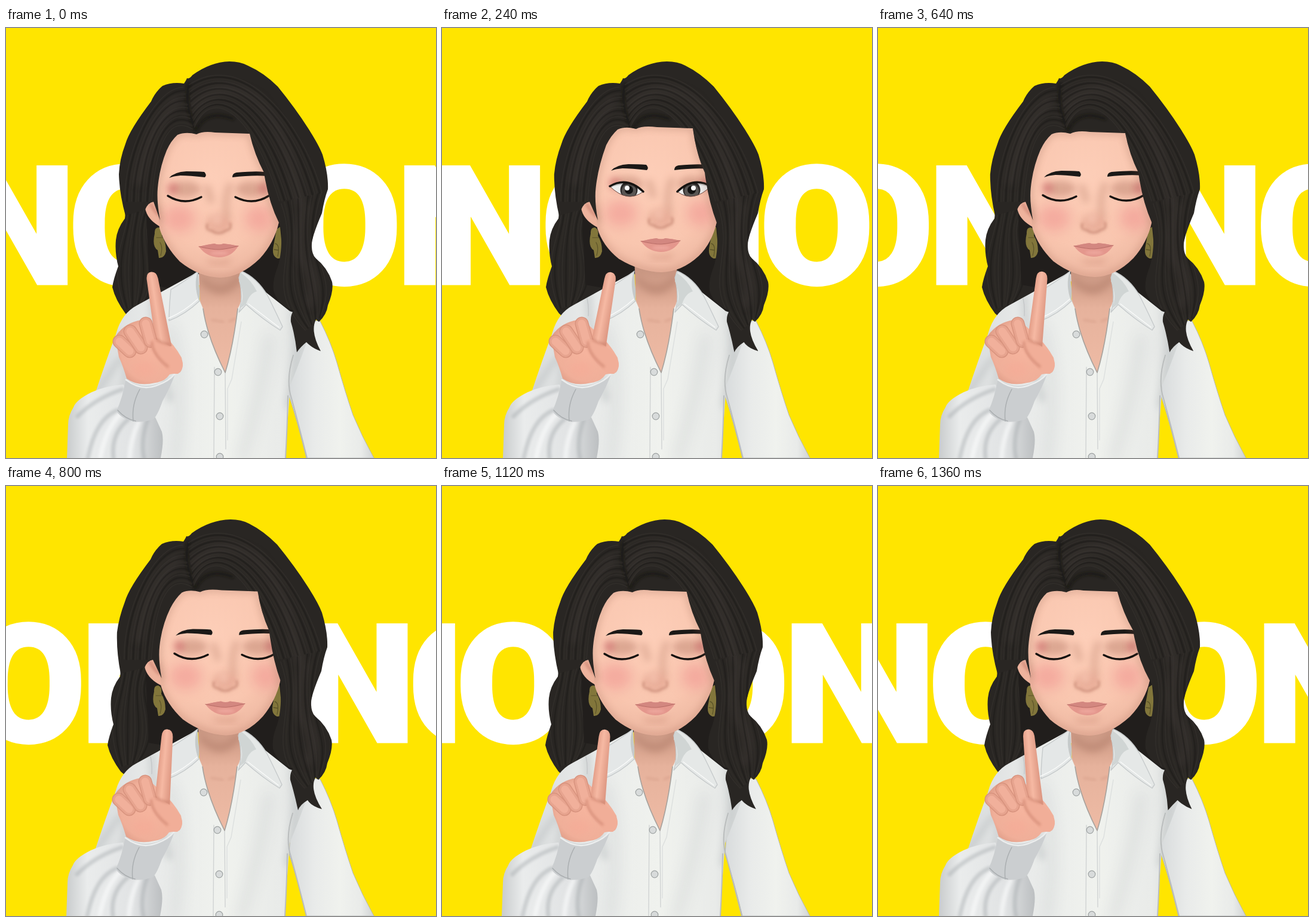
Animation, 720 px wide and 720 px high, one loop 1.44 s. Source, as an HTML page:

```html
<!DOCTYPE html>
<html lang="en">
<head>
<meta charset="utf-8">
<title>No no no</title>
<style>
html, body { margin: 0; width: 100%; height: 100%; overflow: hidden; background: #ffe500; }
svg { display: block; width: 100vw; height: 100vh; }
#words { font: 900 275px Roboto, sans-serif; fill: #fff; stroke: #fff; stroke-width: 5px; text-anchor: middle; }
path { stroke-linecap: round; stroke-linejoin: round; }
.line { fill: none; }
</style>
</head>
<body>
<svg viewBox="0 0 720 720">
<defs>
  <filter id="b2" x="-50%" y="-50%" width="200%" height="200%"><feGaussianBlur stdDeviation="2"/></filter>
  <filter id="b6" x="-50%" y="-50%" width="200%" height="200%"><feGaussianBlur stdDeviation="6"/></filter>
  <filter id="b12" x="-80%" y="-80%" width="260%" height="260%"><feGaussianBlur stdDeviation="11"/></filter>
  <radialGradient id="skin" gradientUnits="userSpaceOnUse" cx="345" cy="250" r="190">
    <stop offset="0" stop-color="#fdceb8"/><stop offset=".6" stop-color="#f9c6af"/><stop offset="1" stop-color="#e7b09a"/>
  </radialGradient>
  <linearGradient id="neckSkin" x1="0" y1="0" x2="0" y2="1">
    <stop offset="0" stop-color="#bd8c79"/><stop offset=".35" stop-color="#dca892"/><stop offset=".45" stop-color="#e6b29c"/><stop offset="1" stop-color="#eebba5"/>
  </linearGradient>
  <linearGradient id="cloth" x1="0" y1="0" x2="1" y2="0">
    <stop offset="0" stop-color="#d8dbdc"/><stop offset=".3" stop-color="#e9ebea"/><stop offset=".6" stop-color="#f0f2ee"/><stop offset=".85" stop-color="#e9ebe9"/><stop offset="1" stop-color="#d0d3d4"/>
  </linearGradient>
  <linearGradient id="sleeveFill" x1="0" y1="0" x2="1" y2="0">
    <stop offset="0" stop-color="#c9cccd"/><stop offset=".22" stop-color="#eaecec"/><stop offset=".7" stop-color="#e1e3e4"/><stop offset="1" stop-color="#bcbfc1"/>
  </linearGradient>
  <linearGradient id="fingerFill" x1="0" y1="0" x2="1" y2="0">
    <stop offset="0" stop-color="#e29c86"/><stop offset=".4" stop-color="#f6b9a3"/><stop offset="1" stop-color="#db947f"/>
  </linearGradient>
  <radialGradient id="palmFill" cx=".55" cy=".5" r=".65">
    <stop offset="0" stop-color="#f6b49e"/><stop offset=".7" stop-color="#f0af99"/><stop offset="1" stop-color="#d89580"/>
  </radialGradient>
  <clipPath id="faceClip"><path id="faceClipPath"/></clipPath>
  <clipPath id="eyeClip"><path id="eyeClipPath"/></clipPath>
  <clipPath id="hairClip"><path id="hairClipPath"/></clipPath>
  <clipPath id="torsoClip"><use href="#torso"/></clipPath>
  <clipPath id="lockClip"><use href="#lock"/></clipPath>
  <g id="eyeShade">
    <ellipse cx="301" cy="270" rx="25" ry="13" fill="#c78f7c" opacity=".6" filter="url(#b6)"/>
    <ellipse cx="279" cy="269" rx="9" ry="10" fill="#cf6f70" opacity=".65" filter="url(#b6)"/>
  </g>
  <g id="eye">
    <g clip-path="url(#eyeClip)">
      <rect x="265" y="255" width="70" height="45" fill="#eeeeee"/>
      <circle cx="303" cy="280" r="14.5" fill="#2e2b2a"/>
      <circle cx="303" cy="282" r="12" fill="#595654"/>
      <circle cx="303" cy="280" r="7" fill="#141313"/>
      <circle cx="300" cy="277" r="4" fill="#fff"/>
      <path class="line" d="M271 273Q300 260 328 281" stroke="#000" stroke-width="7" opacity=".2"/>
    </g>
    <path id="underLid" class="line" stroke="#6b453c" stroke-width="1"/>
    <path id="lash" class="line" stroke="#151210" stroke-width="3.4"/>
  </g>
</defs>

<rect width="720" height="720" fill="#ffe500"/>
<g id="words"></g>

<g id="figure">
  <g id="locks">
    <path id="lock" fill="#292623" d="M225 240L200 300Q200 312 199 319Q186 336 184 355Q182 376 188 399Q180 420 178 434Q183 455 200 478L225 500L320 440L320 240Z"/>
    <g id="lockStrands" clip-path="url(#lockClip)"></g>
  </g>
  <path fill="#211e1c" d="M230 200L480 200L500 495L430 460L322 412L275 436L240 430Z"/>

  <path d="M322 380L392 380Q394 440 402 470L385 580L350 580L325 470Z" fill="url(#neckSkin)"/>
  <path d="M325 415Q360 445 392 412L393 424Q362 466 327 428Z" fill="#a87562" opacity=".45" filter="url(#b6)"/>
  <path class="line" d="M345 489L364 492M384 487L374 491" stroke="#c88e7a" stroke-width="3" opacity=".4" filter="url(#b2)"/>

  <path id="arm" d="M505 488L526 491Q544 526 554 560Q568 610 581 648Q596 684 616 720L503 720Q488 658 474 616Q478 540 505 488Z" fill="url(#cloth)" stroke="#b5b8b9"/>
  <path id="torso" fill="url(#cloth)" d="M322 408Q312 430 330 470Q337 518 367 577Q380 535 388 470Q400 452 392 408Q410 412 432 440L475 474L516 488Q500 540 476 598Q471 660 468 720L140 720L150 610Q168 555 184 513Q193 478 220 464Z"/>
  <g clip-path="url(#torsoClip)">
    <path class="line" d="M246 452Q244 500 274 620M484 480Q494 540 474 630" stroke="#9fa5a7" stroke-width="13" opacity=".3" filter="url(#b6)"/>
    <path class="line" d="M275 505Q300 580 284 720M440 520Q430 600 395 720" stroke="#c2c6c8" stroke-width="16" opacity=".35" filter="url(#b12)"/>
    <path class="line" d="M185 512Q210 545 195 612M150 612L190 555" stroke="#b8bcbd" stroke-width="9" opacity=".55" filter="url(#b6)"/>
  </g>
  <path class="line" d="M481 548Q468 590 478 620Q490 664 504 720M472 616Q471 670 468 720" stroke="#babdbd" stroke-width="2"/>
  <path class="line" d="M243 453Q246 466 245 482M489 510L487 530" stroke="#c5c8c9" stroke-width="1.5"/>

  <path class="line" d="M349 568L348 720M367 577L368 705" stroke="#d0d3d3" stroke-width="1.4"/>
  <path class="line" d="M394 492L378 588L371 604V690" stroke="#dde0df" stroke-width="1.5"/>
  <path class="line" d="M330 470Q337 518 367 577Q380 535 388 470" stroke="#a6a19c" stroke-width="1.6"/>
  <path d="M322 407Q298 425 276 438Q273 468 273 490Q300 480 324 457Q314 430 322 407Z" fill="#e4e7e7" stroke="#c6cacb" stroke-width="1.4"/>
  <path d="M322 407Q312 432 329 468L324 457Q325 440 323 428Z" fill="#c5caca"/>
  <path d="M394 407Q420 418 438 448Q452 476 463 500L459 506Q430 488 402 463L390 476Q398 452 390 418Z" fill="#e5e8e7" stroke="#c6cacb" stroke-width="1.4"/>
  <path d="M392 409Q411 422 420 441Q408 444 402 462L391 470Q402 450 390 424Z" fill="#d0d5d4"/>
  <path class="line" d="M272 486Q298 475 321 454M406 462Q432 482 457 501" stroke="#fafbfa" stroke-width="1.5"/>
  <g id="buttons" fill="#d8dbdb" stroke="#9da2a2" stroke-width="1.2"></g>

  <path d="M252 280Q232 282 233 302Q237 323 263 335L272 320L262 282Z" fill="#eeb39d"/>
  <path class="line" d="M243 296Q248 306 258 314" stroke="#c77f6e" stroke-width="6" opacity=".6" filter="url(#b2)"/>

  <g fill="#82763b">
    <path d="M249 344Q248 334 256 334Q263 337 261 348Q268 358 268 374Q265 386 256 385L254 372Q244 366 249 344Z"/>
    <path class="line" d="M252 351L262 351M258 359Q263 367 259 381" stroke="#5e552b" stroke-width="1.2"/>
    <path d="M453 337L459 333L464 385L455 386Q444 382 448 364Z"/>
    <path class="line" d="M451 361Q459 363 455 382M449 371L456 372" stroke="#5c5428" stroke-width="1.3"/>
  </g>

  <path id="face" fill="url(#skin)"/>
  <g clip-path="url(#faceClip)">
    <path id="jawShade" class="line" stroke="#b57a67" stroke-width="9" opacity=".35" filter="url(#b6)"/>
    <g id="features">
      <ellipse cx="290" cy="319" rx="27" ry="22" fill="#ee8d8c" opacity=".5" filter="url(#b12)"/>
      <ellipse cx="424" cy="319" rx="24" ry="22" fill="#ee8d8c" opacity=".5" filter="url(#b12)"/>
      <use href="#eyeShade"/>
      <use href="#eyeShade" transform="translate(711 0) scale(-1 1)"/>
      <path class="line" d="M374 265Q365 292 370 315M337 268L343 288" stroke="#bd8470" stroke-width="12" opacity=".35" filter="url(#b6)"/>
      <ellipse cx="356" cy="327" rx="20" ry="15" fill="#dc9a86" opacity=".6" filter="url(#b6)"/>
      <ellipse cx="353" cy="321" rx="9" ry="9" fill="#fac9b5" opacity=".7" filter="url(#b6)"/>
      <path class="line" d="M337 329Q334 339 344 339Q356 348 368 339Q379 337 375 327" stroke="#b06c5a" stroke-width="3" opacity=".6" filter="url(#b2)"/>
      <path d="M333 387Q357 394 380 385L370 396L344 396Z" fill="#c98773" opacity=".5" filter="url(#b6)"/>
      <path d="M323 366Q340 362 349 361Q357 364 364 361Q375 362 389 365Q378 384 356 384Q335 383 323 366Z" fill="#e4978d"/>
      <path d="M323 366Q340 362 349 361Q357 364 364 361Q375 362 389 365Q372 370 356 371Q340 370 323 366Z" fill="#d38780"/>
      <path class="line" d="M323 366Q344 371 357 371Q371 370 389 365" stroke="#b0655e" stroke-width="1.2" opacity=".8"/>
      <ellipse cx="357" cy="377" rx="15" ry="3" fill="#f0aba1" opacity=".8" filter="url(#b2)"/>
      <use href="#eye"/>
      <use href="#eye" transform="translate(711 0) scale(-1 1)"/>
      <g id="brows" fill="#1b1917">
        <path d="M273 251Q282 241 302 240Q319 240 332 241Q337 246 333 250Q307 247 292 247Q280 248 273 251Z"/>
        <path d="M379 250Q379 243 386 242Q420 239 432 241Q437 245 438 248Q414 246 379 250Z"/>
      </g>
    </g>
    <path id="hairShade" class="line" stroke="#8c5a49" stroke-width="7" opacity=".3" filter="url(#b6)"/>
  </g>
  <path id="frontHair" fill="#292623"/>
  <g clip-path="url(#hairClip)">
    <path class="line" d="M318 130Q360 82 420 120Q470 170 492 290M285 125Q240 160 222 255M500 300Q480 370 505 400Q520 425 510 460" stroke="#3d3934" stroke-width="18" opacity=".55" filter="url(#b6)"/>
    <path class="line" d="M306 95Q298 130 318 172Q335 135 380 152" stroke="#141210" stroke-width="5" opacity=".6" filter="url(#b2)"/>
    <g id="strands"></g>
  </g>

  <g id="hand">
    <path d="M197 597Q166 599 143 610Q117 623 113 635Q104 649 104 664L102 720L259 720Q265 690 261 676L250 652Q230 655 218 659Z" fill="url(#sleeveFill)"/>
    <path class="line" d="M186 640Q150 655 137 720M205 655Q175 680 180 720M237 656Q225 690 231 720M195 605Q150 620 120 650" stroke="#a5aaad" stroke-width="7" opacity=".45" filter="url(#b2)"/>
    <path class="line" d="M190 648Q168 670 158 718M222 660Q208 690 207 720" stroke="#fbfcfc" stroke-width="8" opacity=".6" filter="url(#b2)"/>
    <path d="M201 587Q225 605 250 597Q270 592 284 577Q276 600 262 625Q254 648 247 655Q229 661 213 659Q191 653 185 641Q195 620 201 587Z" fill="#cbced0"/>
    <path class="line" d="M201 589Q226 608 251 599Q272 592 282 580" stroke="#eceeee" stroke-width="2.5"/>
    <path class="line" d="M224 605Q210 630 213 658M187 640Q200 655 217 658" stroke="#aaaeb0" stroke-width="1.5"/>
    <path d="M183 517Q200 490 235 488L262 512Q282 530 294 552Q298 570 291 577L274 580Q266 592 250 594Q221 601 202 587Q196 566 189 551Z" fill="url(#palmFill)"/>
    <g id="finger">
      <path d="M250 535L252 420Q252 407 261 407Q270 407 271 419L276 535Z" fill="url(#fingerFill)"/>
    </g>
    <g id="fist"></g>
    <path d="M244 521Q253 520 262 527Q283 535 295 557Q299 571 288 579Q273 580 268 571Q246 549 243 531Z" fill="#f1ae98"/>
    <path class="line" d="M244 526Q245 546 271 567M252 522Q263 528 274 530" stroke="#c07561" stroke-width="3" opacity=".65" filter="url(#b2)"/>
    <ellipse cx="232" cy="571" rx="18" ry="13" fill="#f5ab97" opacity=".6" filter="url(#b6)"/>
  </g>
</g>
</svg>

<script>
const FRAME = 80, COUNT = 18, PERIOD = 366;
const $ = id => document.getElementById(id);
const NS = 'http://www.w3.org/2000/svg';
const add = (parent, tag, attrs, text) => {
  const el = document.createElementNS(NS, tag);
  for (const k in attrs) el.setAttribute(k, attrs[k]);
  if (text) el.textContent = text;
  parent.append(el);
};
const set = (id, name, value) => $(id).setAttribute(name, value);
const move = (id, x, y) => set(id, 'transform', `translate(${x} ${y})`);

for (let k = -1; k < 3; k++) {
  add($('words'), 'text', { x: 19 + k * PERIOD, y: 428 }, 'N');
  add($('words'), 'text', { x: 200.5 + k * PERIOD, y: 428 }, 'O');
}
for (const [x, y] of [[332, 513], [355, 576], [358, 650], [358, 718]])
  add($('buttons'), 'circle', { cx: x, cy: y, r: 5.8 });

// Curled fingers: a soft dark edge under a lighter capsule
for (const [a, b, c, d] of [[190, 525, 207, 541], [208, 508, 226, 535], [234, 495, 242, 524]])
  for (const [w, color] of [[23, '#d8937e'], [20, '#e7a48f'], [13, '#f1b09b']])
    add($('fist'), 'path', { d: `M${a} ${b}L${c} ${d}`, stroke: color, 'stroke-width': w });

// Fill the space between two cubic curves with fine strands
function strands(parent, a, b, n) {
  for (let i = 0; i < n; i++) {
    const p = a.map((v, j) => (v + (b[j] - v) * (i + .5) / n).toFixed(1));
    add(parent, 'path', {
      d: `M${p[0]} ${p[1]}C${p.slice(2).join(' ')}`,
      class: 'line',
      stroke: ['#3b3733', '#1d1a18', '#322e2b'][i % 3],
      'stroke-width': 1.5 + i * 7 % 3,
      opacity: .5
    });
  }
}
strands($('strands'), [306, 93, 400, 32, 500, 160, 531, 275], [316, 168, 340, 105, 405, 125, 456, 290], 19);
strands($('strands'), [296, 96, 245, 100, 195, 210, 197, 290], [313, 172, 270, 145, 252, 205, 246, 290], 13);
strands($('strands'), [531, 275, 490, 390, 566, 400, 528, 482], [458, 295, 495, 385, 422, 430, 500, 507], 13);
strands($('lockStrands'), [202, 290, 208, 350, 160, 380, 198, 470], [256, 300, 213, 360, 285, 390, 232, 460], 11);

// Looping keys with a cosine ease between neighbours
function key(list, i) {
  let n = 1;
  while (list[n][0] < i) n++;
  const [t0, v0] = list[n - 1], [t1, v1] = list[n];
  return v0 + (v1 - v0) * (1 - Math.cos(Math.PI * (i - t0) / (t1 - t0))) / 2;
}
const TURN = [[0, 0], [3, 10], [5, -1], [8, 5], [12, 19], [14, 3], [17, -6], [18, 0]];
const LIFT = [[0, 0], [3, -9], [5, -2], [8, -1], [12, 0], [18, 0]];
const SWAY = [[0, 0], [3, -4], [5, -1], [8, -4], [12, -10], [14, -3], [17, 0], [18, 0]];
const LEAN = [[0, 0], [8, 0], [12, -2], [14, -2], [17, 0], [18, 0]];
const OPEN = [[0, 0], [1, 0], [3, 1], [5, 0], [18, 0]];

function facePath(d, y) {
  const l = .3 * d, c = .85 * d, r = .3 * d;
  return `M${253 + l} 300L${257 + l} 335Q${266 + l} 365 ${291 + c * .6} ${391 + y * .5}` +
    `Q${323 + c} ${417 + y} ${359 + c} ${418 + y}Q${393 + c} ${417 + y} ${425 + c * .6} ${386 + y * .5}` +
    `Q${449 + r} 360 ${457 + r} 325`;
}

// Hairline from the right temple over the forehead to the left ear
function hairline(d, y) {
  return `${457 + .3 * d} 326Q${439 + .7 * d} 290 ${432 + .8 * d} 242Q${416 + d} 212 ${408 + 1.2 * d} ${177 + y}` +
    `L${350 + d} ${175 + y}Q${330 + .6 * d} ${172 + y} ${319 + .6 * d} ${178 + y}` +
    `Q${301 + .6 * d} ${173 + y} ${287 + .7 * d} ${179 + y}Q${276 + .7 * d} ${189 + y} ${269 + .6 * d} ${205 + y}` +
    `Q${257 + .4 * d} 234 ${254 + .35 * d} 268Q${252 + .3 * d} 290 ${258 + .3 * d} 322`;
}

function hairPath(d, y, sway) {
  const s = .25 * d, tip = 9 * Math.max(0, d - 12);
  return `M298 93Q302 87 303 84Q307 86 312 79Q342 57 ${374 + s} 56Q${392 + s} 56 ${405 + s} 63Q432 75 455 98` +
    `Q485 135 506 168Q524 196 530 212Q540 245 539 270Q533 286 529 310Q512 350 512 362` +
    `Q511 378 519 386Q538 401 546 425Q549 440 539 464Q537 480 524 492L519 488` +
    `Q509 508 ${527 + s} 541Q512 536 ${503 + s} ${526 - tip / 4}Q493 534 ${487 + s} ${543 - tip}` +
    `Q484 515 477 492Q476 480 482 473Q455 464 448 440Q446 424 453 405Q463 380 461 337` +
    `L${hairline(d, y)}L247 291Q238 292 233 304L${200 + sway} 314Q${190 + .6 * sway} 278 ${189 + .3 * sway} 245` +
    `Q190 220 200 194Q207 170 243 123Q249 108 262 97Q278 90 298 93Z`;
}

function draw(i) {
  const lean = key(LEAN, i), d = key(TURN, i), y = key(LIFT, i), o = key(OPEN, i), sway = key(SWAY, i);
  move('words', i * PERIOD / COUNT, 0);
  move('figure', lean, 0);
  move('arm', -lean, 0);
  move('features', d, y);
  move('brows', 0, -3 * o);
  move('locks', sway, 0);

  const jaw = facePath(d, y), full = jaw + 'L470 160L250 160Z', hair = hairPath(d, y, sway);
  set('face', 'd', full);
  set('faceClipPath', 'd', full);
  set('jawShade', 'd', jaw);
  set('hairShade', 'd', 'M' + hairline(d, y));
  set('frontHair', 'd', hair);
  set('hairClipPath', 'd', hair);

  const side = 281 - 7 * o, top = 298 - 41 * o, low = 298 + 5 * o;
  const lid = `M271 ${side}Q${298 + 2 * o} ${top} 327 283`;
  set('lash', 'd', lid);
  set('underLid', 'd', `M271 ${side}Q300 ${low} 327 283`);
  set('eyeClipPath', 'd', `${lid}Q300 ${low} 271 ${side}Z`);

  const a = i * Math.PI / 3;
  const wag = Math.atan((2 - 20 * Math.cos(a) + 2 * Math.sin(a)) / 115) * 180 / Math.PI;
  set('finger', 'transform', `rotate(${wag} 262 525)`);
}

let last = -1;
function tick() {
  const i = Math.floor(performance.now() / FRAME) % COUNT;
  if (i !== last) draw(last = i);
  requestAnimationFrame(tick);
}
tick();
</script>
</body>
</html>
```
